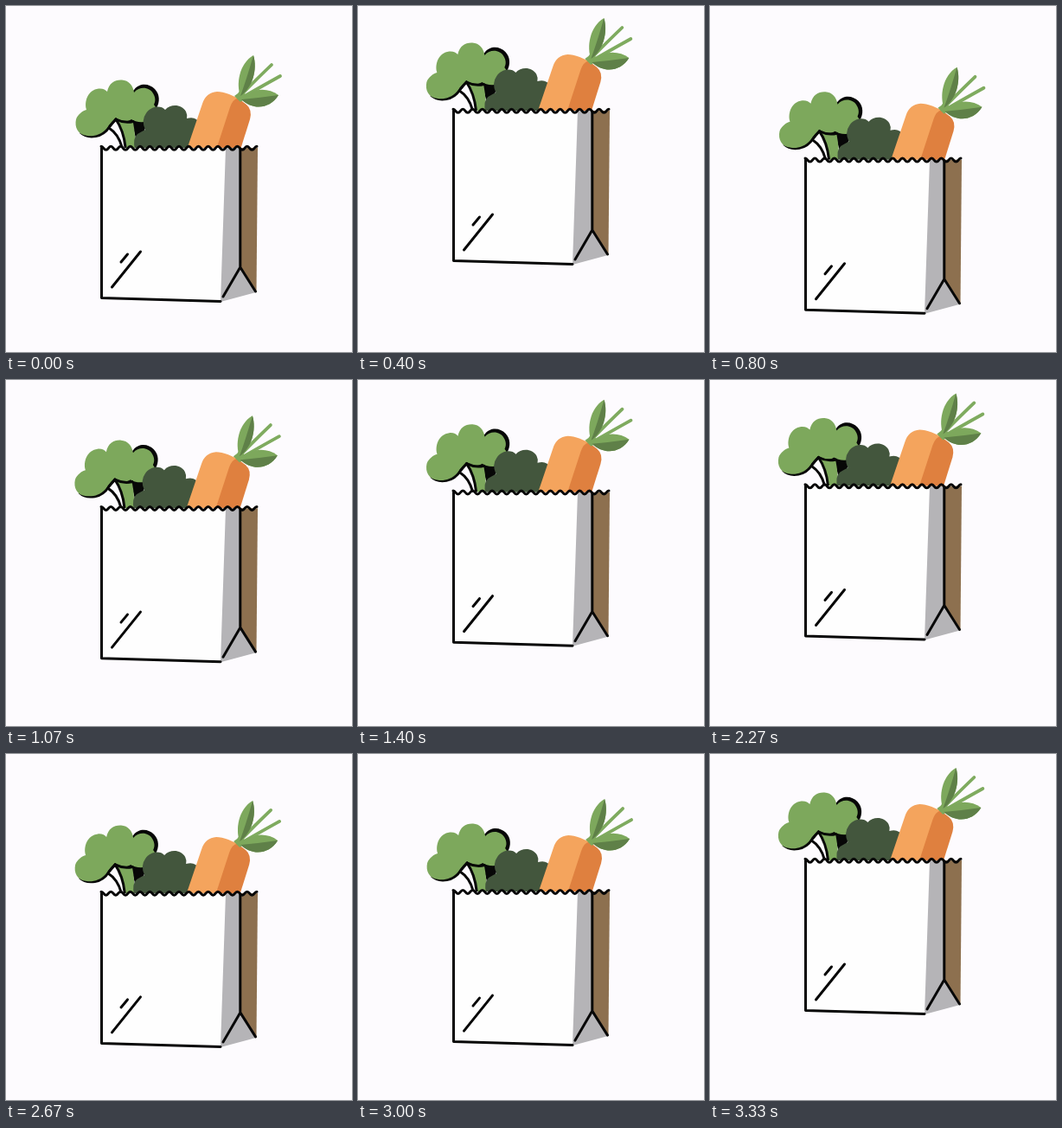
Write an HTML page that moves like this. It is 400x400 px and loops after 3.4 s.

```html
<!DOCTYPE html>
<html lang="en">
<head>
<meta charset="utf-8">
<title>Grocery bag</title>
<style>
  html, body { margin: 0; width: 100%; height: 100%; overflow: hidden; background: #fdfbfe; }
  svg { display: block; width: 100vw; height: 100vh; }
  .ink { fill: none; stroke: #070707; stroke-width: 3; stroke-linecap: round; stroke-linejoin: round; }
  .sprig { fill: none; stroke: #7fab5f; stroke-width: 3.8; stroke-linecap: round; }
  .light { fill: #7da85c; }
  .dark { fill: #5f8048; }
</style>
</head>
<body>
<svg viewBox="0 0 400 400">
  <g id="bag">
    <g id="veg">
      <!-- broccoli -->
      <path fill="#070707" d="M148 97C155 88 166 90 172 96C178 102 178 111 174 118Q174 130 165 136Q161 140 159 146L150 153L146 136L128 132L121 140Q115 150 104 152Q92 154 85 147Z"/>
      <path class="light" d="M127 132Q137 146 139 164H149Q150 150 147 135Z"/>
      <path class="light" d="M94 150C83 149 79 140 81 131C83 125 89 121 93 120C90 110 95 97 107 95.500C112 95 115 97 117 99C119 89 126 85 134 85.500C142 86 147 92 148 100C155 92 166 94 170 101C173 106 173 110 171 114C176 120 174 129 167 132C159 136 149 134 145 131C139 135 132 133 127 129C123 133 119 138 116 142C110 149 101 151 94 150Z"/>
      <path class="ink" d="M119 141Q130 148 134 163" stroke-width="2.8"/>
      <path class="ink" d="M120 139Q123 135 127 131Q136 144 138 163" stroke-width="2.8"/>
      <path class="ink" d="M127 131Q137 136 147 133.500" stroke-width="2.6"/>
      <!-- dark bush -->
      <path fill="#43563d" d="M149 166Q146 153 152 148Q157 145 161 143Q156 132 162 124C167 116 179 114 184 120C190 113 203 113 208 122Q210 126 209 130Q220 127 224 136Q228 145 222 166Z"/>
      <!-- carrot -->
      <path fill="#df803f" d="M236 166L255 106L267 105.500L278 114Q285 120 282 131L271 166Z"/>
      <path fill="#f4a45d" d="M209 166L227 113Q231 100 244 99Q250 99 258 102L268 106.500Q262 108 259 117L243 166Z"/>
      <g>
        <path class="sprig" d="M269 106Q282 92 307 68M271 107Q290 96 317 81"/>
        <path class="light" d="M264 104Q269 101 271 97L279 104Q275 109 271 111Z"/>
        <path class="light" d="M271 104C266 91 269 67 286 57C291 73 285 95 271 104Z"/>
        <path class="dark" d="M271 104Q278 85 286 57C291 73 285 95 271 104Z"/>
        <path class="light" d="M272 108C282 95 302 93 315 103C305 119 286 121 272 108Z"/>
        <path class="dark" d="M272 108Q294 106 315 103C305 119 286 121 272 108Z"/>
      </g>
    </g>
    <path fill="#fefefe" d="M110 164H254L248 342L111 338Z"/>
    <path fill="#b5b4b7" d="M254 164H271V302L289 331L248 342Z"/>
    <path fill="#8d704f" d="M271 164H291L289.500 331L271 302Z"/>
    <path class="ink" id="edge"/>
    <path class="ink" d="M110.500 164V337.500L248 341.500"/>
    <path class="ink" d="M270.800 165V302L251 336M270.800 302L288.500 330" stroke-width="2.6"/>
    <path class="ink" d="M155.500 284L122.500 325M140.500 287L133 296"/>
  </g>
</svg>
<script>
  const LOOP = 3400, STEP = 1000 / 15, TEETH = 16;
  // [time, height] at each turning point of the hop
  const TURNS = [[0, 0], [400, -43], [810, 14], [1310, -38], [1785, 12.3],
                 [2300, -42], [2830, 11.5], [3335, -41]];

  const get = id => document.getElementById(id);
  const bag = get('bag'), veg = get('veg');

  const half = 90 / TEETH;
  get('edge').setAttribute('d', 'M110 162.3' +
    `c${half / 2} 0 ${half / 2} 4 ${half} 4c${half / 2} 0 ${half / 2} -4 ${half} -4`.repeat(TEETH));

  function height(t) {
    let i = 1;
    while (i < TURNS.length - 1 && t > TURNS[i][0]) i++;
    let [a, b] = [TURNS[i - 1], TURNS[i]];
    if (a[1] < b[1]) [a, b] = [b, a];
    const u = Math.min(1, (t - a[0]) / (b[0] - a[0]));
    // the bag lingers a little at the top of the hop
    const rise = ((1 - Math.cos(Math.PI * u)) / 2) ** 0.85;
    return a[1] + (b[1] - a[1]) * rise;
  }

  function draw() {
    const now = performance.now() % LOOP;
    const t = Math.floor((now + 4) / STEP) * STEP % LOOP;
    const y = height(t), drift = Math.min(1, t / 400);
    bag.setAttribute('transform', `translate(0 ${y.toFixed(2)})`);
    veg.setAttribute('transform', `translate(${(y * 0.02 - drift * 0.8).toFixed(2)} 0)`);
    requestAnimationFrame(draw);
  }
  draw();
</script>
</body>
</html>
```
